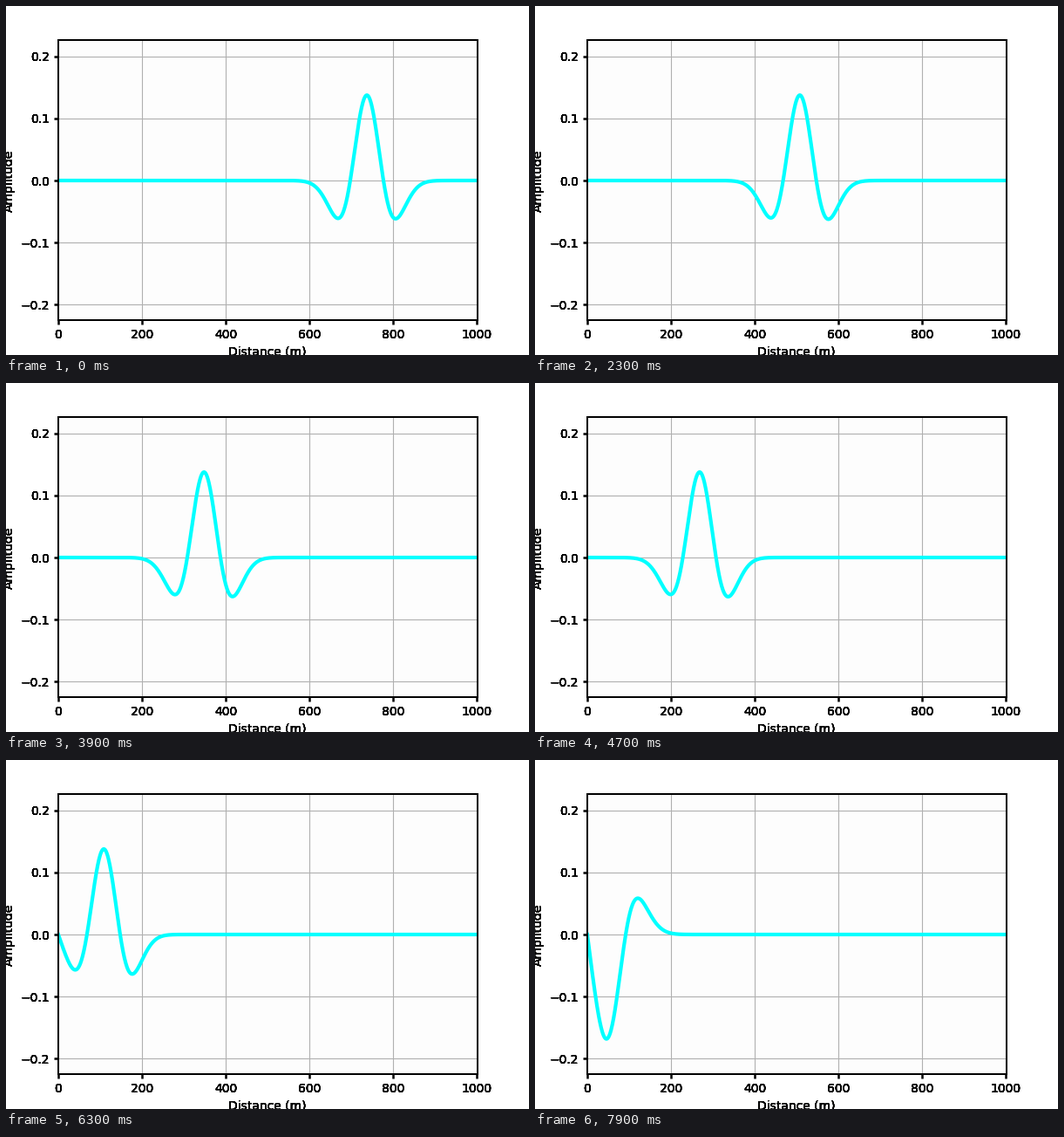
Recreate the animation shown at these times as a matplotlib script. Size 600 by 400 pixels, loop 8 s.

```python
import numpy as np
import matplotlib.pyplot as plt
from matplotlib.animation import FuncAnimation
from matplotlib.patches import Rectangle

FRAMES, INTERVAL = 80, 100
AMP, WIDTH = 0.1375, 39.7      # peak height, wavelet width in metres
START, STEP = 737.3, 10.0      # first peak position, metres per frame

plt.rcParams.update({"font.family": "DejaVu Sans", "font.size": 10})


def wavelet(d, disp):
    """Ricker pulse with a small dispersion term that skews its side lobes."""
    s = d / WIDTH
    ricker = 1 - s**2
    skew = s**5 - 10 * s**3 + 15 * s
    return AMP * (ricker + disp * skew) * np.exp(-s**2 / 2)


def wave(i):
    """Pulse moving left, reflected with opposite sign at the fixed end."""
    c = START - STEP * i
    disp = 0.001 + 0.0001 * i
    return wavelet(x - c, disp) - wavelet(-x - c, disp)


def heavy(text, times=8):
    """Overdraw a text so that its soft edges turn solid."""
    draw = text.draw

    def redraw(renderer):
        for _ in range(times):
            draw(renderer)

    text.draw = redraw


fig = plt.figure(figsize=(6, 4), dpi=100, facecolor="white")
ax = fig.add_axes([0.1, 0.1, 0.8, 0.8], facecolor="#fdfdfd")
ax.set(xlim=(0, 1000), ylim=(-0.225, 0.225),
       xlabel="Distance (m)", ylabel="Amplitude")
ax.set_xticks(range(0, 1001, 200))
ax.set_yticks([-0.2, -0.1, 0.0, 0.1, 0.2])
ax.tick_params(width=1.8)
ax.grid(True, color="#b0b0b0", linewidth=0.8)
ax.spines[:].set_visible(False)
fig.add_artist(Rectangle((60, 40), 481, 321, transform=None, fill=False,
                         edgecolor="black", linewidth=1.44, zorder=5))

for label in [*ax.get_xticklabels(), *ax.get_yticklabels(),
              ax.xaxis.label, ax.yaxis.label]:
    heavy(label)

x = np.linspace(0, 1000, 1001)
line, = ax.plot(x, wave(0), color="cyan", linewidth=3)


def update(i):
    line.set_ydata(wave(i))
    return line,


anim = FuncAnimation(fig, update, frames=FRAMES, interval=INTERVAL,
                     repeat=True, repeat_delay=0, blit=False)
plt.show()
```
